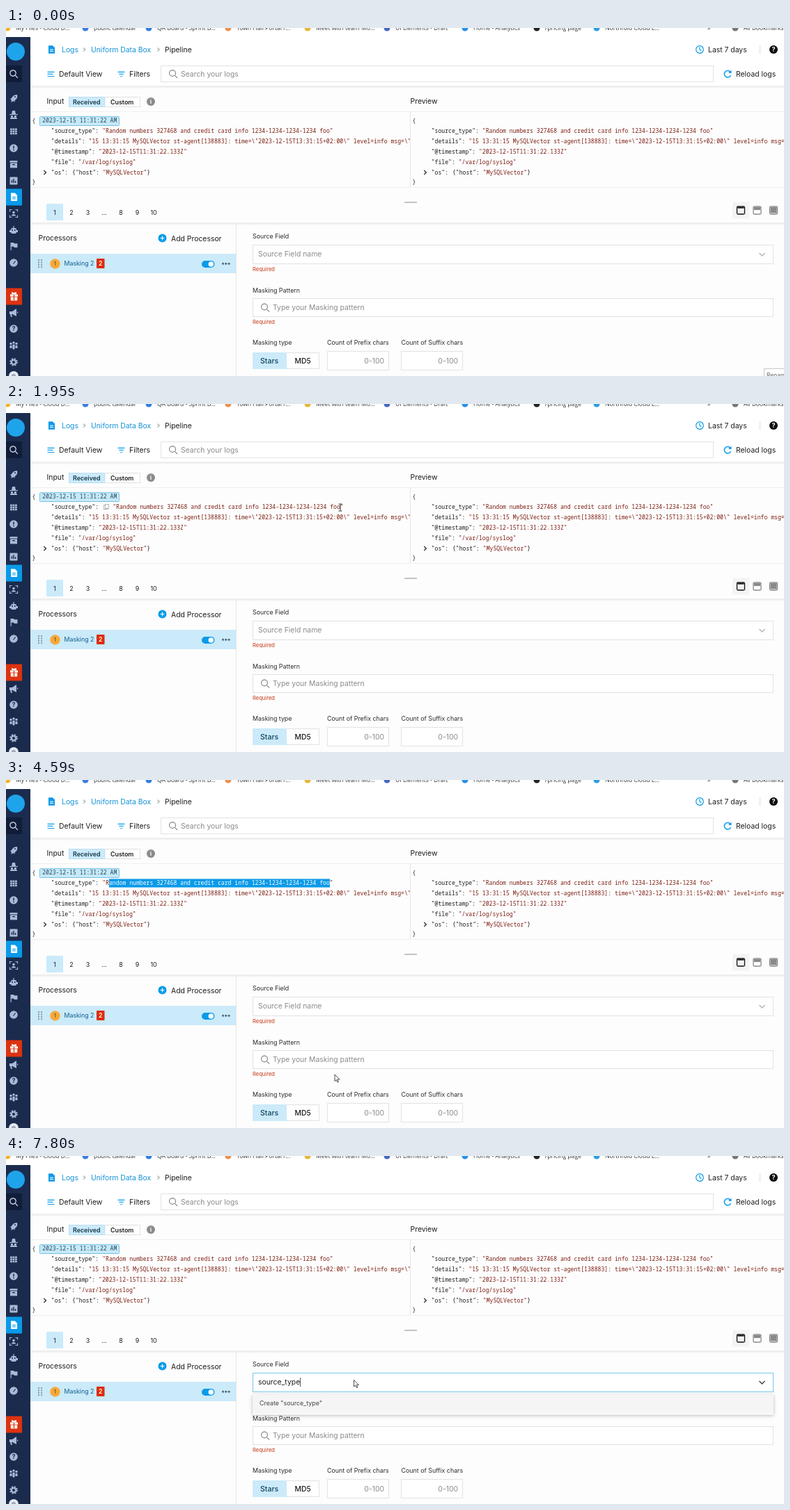
Animation of 1117 by 501 pixels, one loop 8000 ms. Source, as an HTML page:

```html
<!DOCTYPE html>
<html lang="en">
<head>
<meta charset="utf-8">
<title>Pipeline editor</title>
<style>
html, body { margin: 0; width: 100%; height: 100%; overflow: hidden; background: #fdfdfd; }
svg { display: block; font-family: Inter, sans-serif; }
.mono { font: 8.13px "Noto Sans Mono", monospace; white-space: pre; }
.bar { font: 8.6px "Open Sans", sans-serif; }
.line { fill: none; stroke-width: 1.2; }
</style>
</head>
<body>
<svg id="stage" width="1117" height="501" viewBox="0 0 1117 501"></svg>
<script>
const LOOP = 8000, CH = 4.878;
const BLUE = '#0a9ae8', PALE = '#cbeafa', INK = '#1d1d1f', RED = '#7c1d12', GREY = '#8a8a8a', NAVY = '#1b2b4d', ICON = '#a9b9d8';

const rect = (x, y, w, h, fill, more = '') => `<rect x="${x}" y="${y}" width="${w}" height="${h}" fill="${fill}" ${more}/>`;
const box = (x, y, w, h, stroke = '#e2e2e2', fill = '#fff', more = '') =>
  rect(x + .5, y + .5, w - 1, h - 1, fill, `stroke="${stroke}" ${more}`);
const disc = (x, y, r, fill, more = '') => `<circle cx="${x}" cy="${y}" r="${r}" fill="${fill}" ${more}/>`;
const path = (d, stroke, more = '') => `<path class="line" d="${d}" stroke="${stroke}" ${more}/>`;
const shape = (d, fill, more = '') => `<path d="${d}" fill="${fill}" ${more}/>`;
// text centred vertically on y
const text = (x, y, s, fill = INK, size = 10.4, more = '') =>
  `<text x="${x}" y="${y + size * .363}" fill="${fill}" font-size="${size}" ${more}>${s}</text>`;
const code = (x, y, s, fill = INK, more = '') => `<text class="mono" x="${x}" y="${y}" fill="${fill}" ${more}>${s}</text>`;
const at = (x, y, s) => `<g transform="translate(${x} ${y})">${s}</g>`;
const lens = (x, y, r, c) => at(x, y, `<circle class="line" r="${r}" stroke="${c}" cx="-1" cy="-1"/>` + path(`M${r * .6} ${r * .6}L${r + 1.6} ${r + 1.6}`, c));

function bookmarks() {
  const items = [[14, 'My Files - Cloud D...', '#f2b51d'], [126, 'public calendar', '#3c7fe0'], [217, 'QA Board - Sprint B...', '#2f7fe6'],
    [331, 'Town Hall Portal /...', '#f0904a'], [445, 'Meet with team Mo...', '#e8b63a'], [559, 'UI Elements - Draft', '#4a66c8'],
    [671, 'Home - Analytics', '#2b8fe8'], [774, '/pricing page', '#222'], [860, 'Northfold Cloud L...', '#2d9ee0'],
    [1007, '»', ''], [1059, 'All Bookmarks', '#777']];
  return rect(0, 0, 1117, 13, '#fff') + items.map(([x, s, c]) =>
    (c ? disc(x - 12, 0, 4.5, c) : '') + `<text class="bar" x="${x}" y="2.6" fill="#333">${s}</text>`).join('');
}

function sidebar() {
  const c = ICON, n = NAVY;
  const cells = [-4.5, -1.4, 1.7].flatMap(y => [-5, -1.5, 2].map(x => rect(x, y, 2.8, 2.6, c))).join('');
  const icons = [
    [102, shape('M5-6C0-6-2-3-3-1L-5 0-3 2-4 5 0 3 1 5 2 2C5 0 6-3 5-6Z', c) + disc(2, -3, 1, n)],
    [125, shape('M-3-1-2-6H2L3-1H6V0H-6V-1ZM-5 6C-5 3-2 2 0 4 2 2 5 3 5 6Z', c) + rect(-4, 1, 3, 2, c) + rect(1, 1, 3, 2, c)],
    [149, cells],
    [173, disc(0, 0, 5.8, c) + rect(-.8, -3.4, 1.6, 4, n) + rect(-.8, 1.8, 1.6, 1.6, n)],
    [196, rect(-5.5, -5, 11, 2.5, c) + rect(-5, -1.6, 10, 7, c) + rect(-2, 0, 4, 1.3, n)],
    [220, rect(-5.5, -5.5, 11, 11, c, 'rx="1"') + rect(-3.2, -1, 1.4, 4, n) + rect(-.7, -3, 1.4, 6, n) + rect(1.8, 0, 1.4, 3, n)],
    [267, path('M-5.5-2.5V-5.5H-2.5M2.5-5.5H5.5V-2.5M5.5 2.5V5.5H2.5M-2.5 5.5H-5.5V2.5', c) + disc(0, -1.4, 1.8, c) + shape('M-3 3.6C-3 0 3 0 3 3.6Z', c)],
    [291, rect(-4, -3, 8, 8, c, 'rx="2"') + rect(-.6, -6, 1.2, 3, c) + rect(-6, 0, 12, 3, c) + disc(-1.8, 0, 1, n) + disc(1.8, 0, 1, n)],
    [314, shape('M-4.5-5H0L1-3.8H5.5V2H1L0 .8H-3.3V6H-4.5Z', c)],
    [338, disc(0, 0, 5.8, c) + path('M-.4 1.5 2.6-2.5M-3.5 0V.1M0-3.6V-3.5', n)],
    [410, shape('M-6-2H-2L4-6V5L-2 2H-3L-2 6H-4L-5 2H-6Z', c) + rect(5, -1.5, 1.3, 2, c)],
    [433, disc(0, 0, 5.8, c) + text(0, 0, '?', n, 9, 'font-weight="700" text-anchor="middle"')],
    [457, [-4, 0, 4].map(x => disc(x, x ? -2.5 : -4, 1.7, c) + rect(x - 1.6, x ? 0 : -1.5, 3.2, x ? 4 : 7, c, 'rx="1"')).join('')],
    [481, `<circle r="4.6" fill="none" stroke="${c}" stroke-width="2.4" stroke-dasharray="2.2 1.41"/><circle r="3" fill="none" stroke="${c}" stroke-width="2"/>`],
    [501, disc(0, 0, 7, '#e6eaf2') + disc(0, 0, 3, '#9aa7bd')]
  ];
  return rect(0, 13, 35, 488, NAVY) + rect(0, 54, 23, 24, '#111d38') + rect(0, 231.5, 23, 24, BLUE) + rect(0, 374.5, 23, 24, '#dd3210') +
    disc(14, 34, 13, '#1ea4ea') + lens(11, 66, 4.2, '#dbe3f1') +
    icons.map(([y, s]) => at(11, y, s)).join('') + at(11.5, 243.3, page('#fff', BLUE)) +
    at(11.5, 386, rect(-5.5, -2.6, 11, 3.2, '#fff') + rect(-4.7, 1.4, 9.4, 5, '#fff') + rect(-.7, -3, 1.4, 9, '#dd3210') + path('M0-3C-5-3-3-8 0-3 3-8 5-3 0-3', '#fff'));
}

function page(c, hole) {
  return shape('M-4.5-5.7H1.4L4.6-2.5V5.7H-4.5Z', c) + rect(-2.5, -.4, 5, 1.1, hole) + rect(-2.5, 2, 5, 1.1, hole);
}

function header() {
  const arrow = x => path(`M${x - 1.5} 28.5 ${x + 1.2} 31 ${x - 1.5} 33.5`, '#aaa', 'stroke-width=".9"');
  return rect(35, 13, 1082, 71, '#fff') + rect(35, 83.5, 1082, 1, '#dcdcdc') + rect(35, 84.5, 1082, 2, '#f3f3f3') +
    at(65.5, 31, page(BLUE, '#fff')) + text(80, 31, 'Logs', '#1593d8') + arrow(112.5) +
    text(122, 31, 'Uniform Data Box', '#1593d8') + arrow(219) + text(228, 31, 'Pipeline') +
    `<circle class="line" cx="996" cy="31" r="5.3" stroke="${BLUE}"/>` + path('M996 27.6V31L998.4 32.8', BLUE) +
    text(1008, 31, 'Last 7 days') + rect(1082, 25, 1, 12, '#ddd') +
    disc(1102, 31, 6, '#111') + text(1102, 31, '?', '#fff', 9, 'font-weight="700" text-anchor="middle"') +
    path('M59.5 63.3H69.5M59.5 66.4H67.5M59.5 69.5H69.5M160.5 63.3H170.5M162.3 66.4H168.7M164.2 69.5H166.8', BLUE) +
    text(76, 66.5, 'Default View') + text(177, 66.5, 'Filters') +
    box(222, 54, 794, 24) + lens(240, 66, 4.4, '#888') + text(251, 66, 'Search your logs', GREY) +
    path('M1040 63.3A4.8 4.8 0 1 0 1040.6 68', BLUE, 'style="stroke-width:1.5"') + shape('M1041.5 60.5V65H1037Z', BLUE) + text(1048, 66.5, 'Reload logs');
}

const LONG = String.raw`"15 13:31:15 MySQLVector st-agent[138883]: time=\"2023-12-15T13:31:15+02:00\" level=info msg=\"agent started`;
const RANDOM = '"Random numbers 327468 and credit card info 1234-1234-1234-1234 foo"';

// first two values get ids in the left panel, so they can shift
function json(dx, live) {
  const rows = [['"source_type": ', RANDOM, 'src'], ['"details": ', LONG, 'det'],
    ['"@timestamp": ', '"2023-12-15T11:31:22.133Z"'], ['"file": ', '"/var/log/syslog"']];
  const body = rows.map(([key, value, id], i) => {
    const y = 151.1 + i * 14.85, x = 64.8 + dx;
    return code(x, y, key) + code(x + key.length * CH, y, value, RED, live && id ? `id="${id}"` : '');
  }).join('');
  const host = code(64.8 + dx, 210.5, '"os":') + code(95 + dx, 210.5, `{"host": <tspan fill="${RED}">"MySQLVector"</tspan>}`);
  return code(37.6 + dx, 136.6, '{') + body + host + code(37.6 + dx, 225, '}') + path(`M${54.4 + dx} 205 ${57.4 + dx} 208 ${54.4 + dx} 211`, '#222');
}

function panels() {
  const copy = (x, y, id) => `<g id="${id}">` + box(x, y, 6.5, 7, '#b5b5b5') + box(x + 2, y - 1, 6, 7, '#b5b5b5') + '</g>';
  return text(58.5, 105, 'Input') + rect(90, 99, 52, 15, PALE) + box(141, 99, 52, 15, '#e2e2e2', 'none') + box(90, 99, 52, 15, '#b9dff2', 'none') +
    text(96, 106.5, 'Received', '#17384b', 8.9, 'font-weight="600"') + text(150, 106.5, 'Custom', INK, 8.9, 'font-weight="600"') +
    disc(208, 106, 6, '#8b8b8b') + text(208, 106, 'i', '#fff', 8.5, 'font-weight="700" text-anchor="middle"') +
    text(580.5, 105, 'Preview') + rect(35, 120, 1082, 1, '#efefef') + rect(35, 229, 1082, 1, '#efefef') + rect(580, 121, 1, 108, '#e4e4e4') +
    box(48, 127, 115, 14, '#79c3e8', '#c6e8f8', 'rx="1"') + code(52, 136.4, '2023-12-15 11:31:22 AM', '#24485b') +
    '<clipPath id="left"><rect x="35" y="121" width="545" height="108"/></clipPath><g clip-path="url(#left)">' +
    rect(0, 142.4, 0, 12.2, BLUE, 'id="sel"') + json(0, true) + copy(140, 145, 'copySrc') + copy(121, 159.5, 'copyDet') +
    rect(134, 169, 137, 2.2, '#b9b9b9', 'id="scroll"') + '</g>' + json(545.9);
}

function pager() {
  const pages = [[70, 1], [94, 2], [117.5, 3], [141, '...'], [165, 8], [188.5, 9], [212, 10]];
  const view = (x, h, c) => box(x - 6, 256.5, 12, 12, c, 'none', 'rx="1.5" stroke-width="1.3"') + rect(x - 4.6, 258, 9.2, h, c);
  return rect(572, 250, 18, 2, '#c4c4c4') + rect(58, 253, 24, 24, PALE) +
    pages.map(([x, s]) => text(x, 265.3, s, INK, 8.9, 'text-anchor="middle"')).join('') +
    rect(1043, 250.5, 24, 24, '#f3f3f3') + view(1055, 1.6, '#111') + view(1078.5, 4, '#8a8a8a') + view(1102, 8.5, '#8a8a8a') +
    rect(35, 280.5, 1082, 1, '#dcdcdc') + rect(35, 281.5, 1082, 2, '#f4f4f4');
}

function processors() {
  const grip = [-5, -1.7, 1.6, 4.9].map(y => rect(46, 338 + y, 2, 2, '#8b9aa3') + rect(50, 338 + y, 2, 2, '#8b9aa3')).join('');
  return text(46.5, 302.5, 'Processors') + disc(224.5, 302.5, 6, BLUE) + path('M221.5 302.5H227.5M224.5 299.5V305.5', '#fff') +
    text(237, 302.8, 'Add Processor') + rect(35, 325, 295, 28, PALE) + rect(330, 282, 1, 219, '#e6e6e6') + grip +
    disc(70.5, 339.5, 7.2, '#f7a93b') + text(70.5, 339.5, '1', '#5b3a08', 8, 'text-anchor="middle"') +
    text(83.5, 339.3, 'Masking 2', '#0d5f8f', 8.8) + rect(130, 332, 11.5, 14, '#dd2c0c', 'rx="1"') +
    text(135.8, 339.3, '2', '#fff', 8.6, 'font-weight="600" text-anchor="middle"') +
    rect(281, 335, 18.5, 10, BLUE, 'rx="5"') + disc(294.3, 340, 3.8, '#fff') + [311.5, 315.8, 320.1].map(x => disc(x, 339.3, 1.5, '#56646c')).join('');
}

function form() {
  const label = (x, y, s) => text(x, y, s, '#2b2b2b', 8.87);
  const need = y => text(354, y, 'Required', '#c43a14', 7.6);
  const count = x => box(x, 465, 89, 28) + text(x + 82, 479, '0-100', GREY, 10.4, 'text-anchor="end"');
  return label(354, 300, 'Source Field') + box(354, 312, 748, 28, '#e2e2e2', '#fff', 'id="field"') +
    text(362, 325.5, 'Source Field name', GREY, 10.4, 'id="hint"') + text(362, 325.5, '', INK, 10.4, 'id="typed"') +
    rect(362, 319, .8, 13, '#333', 'id="caret"') + path('M1081.5 324 1085.5 328 1089.5 324', '#aaa', 'id="chevron" style="stroke-width:1.5"') + need(347) +
    rect(354, 343.5, 748, 29, '#fff', 'id="menu" style="filter:drop-shadow(0 1px 2.5px rgba(0,0,0,.28))"') +
    `<g id="option">${rect(354, 343.5, 748, 27.5, '#f5f5f6')}${text(364, 356, '', '#444', 8.87, 'id="create"')}</g>` +
    label(354, 377.5, 'Masking Pattern') + box(354, 389, 748, 27) + lens(372, 402.5, 4.4, '#888') +
    text(383, 402.5, 'Type your Masking pattern', GREY) + need(423) +
    label(354, 453, 'Masking type') + label(461, 453, 'Count of Prefix chars') + label(567.5, 453, 'Count of Suffix chars') +
    box(402, 467, 48, 24) + rect(354, 467, 49, 24, PALE) + text(365, 479, 'Stars', '#12445f', 10.6, 'font-weight="500"') +
    text(414.5, 479, 'MD5', INK, 10.4, 'font-weight="500"') + count(461) + count(567);
}

function overlay() {
  return `<g id="tip">${box(1088, 490, 40, 20, '#c8c8c8')}${text(1092, 500, 'Rename', '#666', 8.5)}</g>` +
    disc(0, 0, 8, '#ffdf1e', 'id="press" fill-opacity=".72"') +
    `<g id="arrow"><path d="M0 0V9.6L2.3 7.6 3.9 11.2 5.4 10.5 3.8 7.1H6.9Z" fill="#fff" stroke="#222" stroke-width=".8"/></g>` +
    `<g id="beam">${path('M-2.3-5H-.6L0-4.5 .6-5H2.3M0-4.5V4.5M-2.3 5H-.6L0 4.5 .6 5H2.3', '#222', 'style="stroke-width:1"')}</g>`;
}

const stage = document.getElementById('stage');
stage.innerHTML = rect(0, 0, 1117, 501, '#fdfdfd') + header() + bookmarks() + panels() + pager() + processors() + form() + sidebar() + overlay();

const el = {};
stage.querySelectorAll('[id]').forEach(e => el[e.id] = e);
const show = (id, on) => el[id].style.display = on ? '' : 'none';
const set = (id, name, value) => el[id].setAttribute(name, value);

const route = [[70, 1112, 494], [800, 474, 164], [930, 473, 162], [1000, 473, 159], [1070, 472, 156], [1400, 472, 156], [1470, 471, 154],
  [1670, 475, 149], [1950, 480, 149], [2230, 480, 149], [2680, 217, 154], [2970, 163, 155], [3250, 163, 155], [3510, 162, 156],
  [3970, 161, 157], [4180, 161, 157], [4590, 472, 424], [4990, 499.5, 322.5], [8001, 499.5, 322.5]];
const keys = [6090, 6150, 6210, 6350, 6550, 6680, 7140, 7410, 7550, 7680, 7800];

function pointer(t) {
  const i = Math.max(1, route.findIndex(p => p[0] > t));
  const [a, b] = [route[i - 1], route[i]];
  const u = Math.max(0, (t - a[0]) / (b[0] - a[0])), k = u * u * (3 - 2 * u);
  return [a[1] + (b[1] - a[1]) * k, a[2] + (b[2] - a[2]) * k];
}

function draw(t) {
  const [x, y] = pointer(t), onText = y < 229 && x < 580;
  show('tip', t < 140);
  show('arrow', t >= 70 && !onText);
  show('beam', onText);
  set('arrow', 'transform', `translate(${x} ${y})`);
  set('beam', 'transform', `translate(${x} ${y})`);
  show('press', (t >= 2230 && t < 4200) || (t >= 5060 && t < 5270));
  set('press', 'cx', x);
  set('press', 'cy', y);

  const overDet = t >= 780 && t < 1070, overSrc = t >= 1070 && t < 4280;
  ['copyDet', 'scroll'].forEach(id => show(id, overDet));
  show('copySrc', overSrc);
  const srcX = 138.2 + (overSrc ? 15 : 0);
  set('src', 'x', srcX);
  set('det', 'x', 118.6 + (overDet ? 15 : 0));

  const selected = t >= 2230 && t < 5060;
  const from = !selected ? 67 : t > 2970 ? 2 : Math.min(67, Math.max(2, Math.round((x - 153.2) / CH + 1)));
  set('sel', 'x', srcX + from * CH);
  set('sel', 'width', (67 - from) * CH);
  el.src.innerHTML = RANDOM.slice(0, from) + `<tspan fill="#fff">${RANDOM.slice(from, 67)}</tspan>"`;

  const focus = t >= 5130, word = 'source_type'.slice(0, keys.filter(k => k <= t).length);
  set('field', 'stroke', focus ? '#7ac8ec' : '#e2e2e2');
  set('chevron', 'stroke', focus ? '#444' : '#b5b5b5');
  show('hint', !word);
  el.typed.textContent = word;
  show('caret', focus && (t < 5810 || word));
  set('caret', 'x', 362 + (word ? el.typed.getComputedTextLength() : 0));
  show('menu', focus);
  set('menu', 'height', word ? 29 : 7);
  show('option', word);
  el.create.textContent = `Create "${word}"`;
}

function tick(now) {
  draw(now % LOOP);
  requestAnimationFrame(tick);
}
draw(0);
requestAnimationFrame(tick);
</script>
</body>
</html>
```
